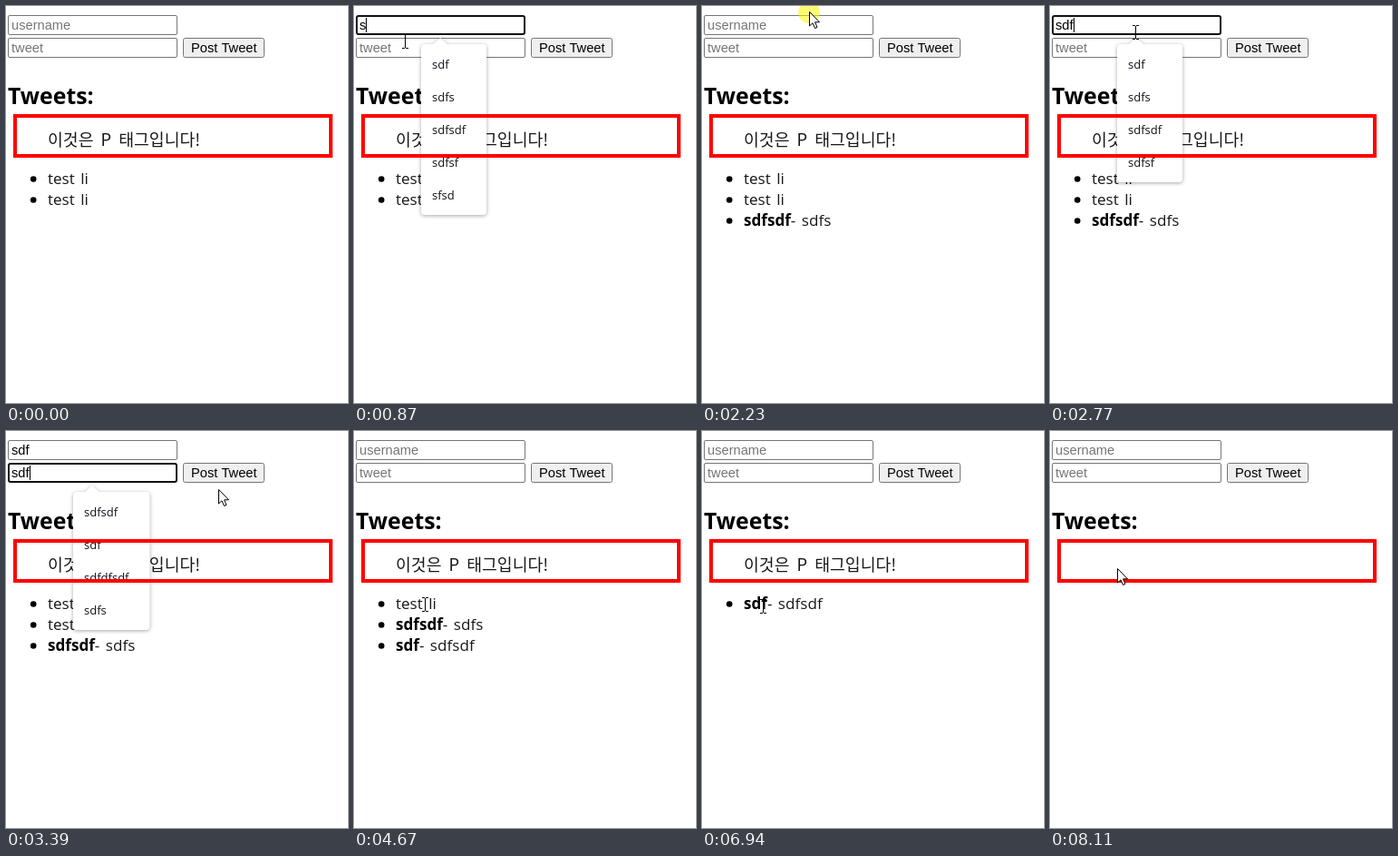
Recreate the animation shown at these times as an HTML page with a canvas. Size 377 by 437 pixels, loop 8.18 s.

```html
<!DOCTYPE html>
<html lang="ko">
<meta charset="utf-8">
<style>
html, body { margin: 0; height: 100%; overflow: hidden; background: #fff }
canvas { display: block }
</style>
<canvas id="stage" width="377" height="437"></canvas>
<script>
const c = document.getElementById('stage').getContext('2d');
const LOOP = 8180;
const UI = '14.67px "Liberation Sans", Arial, sans-serif';
const BODY = '17.1px "Open Sans", "Noto Sans", sans-serif';
const BOLD = 'bold ' + BODY;
const MENU = '13px "Open Sans", "Noto Sans", sans-serif';
const HEAD = 'bold 24.8px "Open Sans", "Noto Sans", sans-serif';
const HANGUL = '300 18.3px "Noto Sans CJK KR Light", "Noto Sans CJK KR", "Noto Sans CJK", sans-serif';
const INK = '#181818';

const fields = [
  { y: 10, hint: 'username', past: ['sdf', 'sdfs', 'sdfsdf', 'sdfsf', 'sfsd', 'asdfasdfasdfasdfasdfas'] },
  { y: 35, hint: 'tweet', past: ['sdfsdf', 'sdf', 'sdfdfsdf', 'sdfs', 'sfd', 'asd'] }
];

// What a click does to the page, given the time since the click
const type = (i, text) => (s, age) => {
  s.focus = i;
  s.open = age > 70;
  s.text[i] = text.slice(0, Math.max(0, Math.floor((age - 80) / 70)));
};
const post = s => {
  s.list.push([s.text[0], '- ' + s.text[1]]);
  s.text = ['', ''];
  s.focus = -1;
};
const drop = s => s.list.shift();
const unbold = s => { s.list[0][0] = ''; };
const clear = s => { s.para = false; };
const nothing = () => {};

// Pointer stops: arrival time, place, click
const stops = [
  [520, 265, 249],
  [680, 110, 24, type(0, 'sdfsdf')],
  [870, 56, 39],
  [1380, 62, 47, type(1, 'sdfs')],
  [1900, 240, 47, post],
  [2180, 118, 6, nothing],
  [2450, 92, 22, type(0, 'sdf')],
  [3100, 100, 46, type(1, 'sdfsdf')],
  [3320, 234, 64],
  [3670, 238, 47, post],
  [4470, 78, 191, drop],
  [5160, 77, 185, drop],
  [5760, 74, 186, unbold],
  [5910, 90, 195],
  [6180, 84, 191, drop],
  [6700, 108, 208],
  [6990, 60, 191, unbold],
  [7360, 80, 189, drop],
  [7880, 84, 152, clear],
  [8110, 74, 151]
].map(([at, x, y, click]) => ({ at, x, y, click }));

function page(t) {
  const s = { list: [['', 'test li'], ['', 'test li']], para: true, text: ['', ''], focus: -1, open: false };
  for (const { at, click } of stops) if (click && t >= at) click(s, t - at);
  return s;
}

// Rest briefly at each stop, then glide to the next in at most half a second
function pointer(t) {
  if (t >= 70 && t < 130) return { x: 198, y: 277 };
  if (t < stops[0].at) return null;
  const i = stops.findIndex(s => s.at > t);
  if (i < 0) return stops.at(-1);
  const a = stops[i - 1], b = stops[i];
  const start = Math.max(a.at + 80, b.at - 500);
  const u = Math.max(0, (t - start) / (b.at - start)), e = u * u * (3 - 2 * u);
  return { x: a.x + (b.x - a.x) * e, y: a.y + (b.y - a.y) * e };
}

const inside = (p, x, y, w, h) => p && p.x >= x && p.x < x + w && p.y >= y && p.y < y + h;

function write(s, x, y, font, color = '#000', gap = 0) {
  c.font = font;
  c.fillStyle = color;
  c.wordSpacing = gap + 'px';
  c.fillText(s, x, y);
  return x + c.measureText(s).width;
}

function disc(x, y, r, color) {
  c.fillStyle = color;
  c.beginPath();
  c.arc(x, y, r, 0, 7);
  c.fill();
}

function box(x, y, w, h, r, fill, stroke, line = 1) {
  c.beginPath();
  c.roundRect(x, y, w, h, r);
  c.fillStyle = fill;
  c.fill();
  c.strokeStyle = stroke;
  c.lineWidth = line;
  c.stroke();
}

function input({ y, hint }, value, active) {
  if (active) box(3, y + 1, 185, 20, 2, '#fff', '#101010', 2);
  else box(2.5, y + .5, 186, 21, 1.5, '#fff', '#767676');
  const end = write(value, 6, y + 16, UI);
  if (!value) write(hint, 6, y + 16, UI, '#757575');
  c.fillStyle = '#000';
  if (active) c.fillRect(Math.round(end), y + 3, 1, 16);
}

function menu(y, items) {
  if (!items.length) return;
  c.font = MENU;
  c.wordSpacing = '0px';
  const w = Math.max(...items.map(s => c.measureText(s).width)) + 35;
  c.save();
  c.shadowColor = 'rgba(0,0,0,.35)';
  c.shadowBlur = 4;
  c.shadowOffsetY = 1;
  c.fillStyle = '#fff';
  c.beginPath();
  c.roundRect(74, y, w, items.length * 36 + 8, 4);
  c.moveTo(87, y);
  c.lineTo(95, y - 7);
  c.lineTo(103, y);
  c.fill();
  c.restore();
  items.forEach((s, i) => write(s, 86, y + 27 + i * 36, MENU, '#10101c'));
}

function cursor(p, t, beam) {
  if (!p) return;
  c.save();
  c.translate(Math.round(p.x), Math.round(p.y));
  if (stops.some(s => s.click && t >= s.at - 40 && t < s.at + 100)) disc(0, 1, 12, 'rgba(250,245,0,.55)');
  c.lineWidth = 1;
  c.strokeStyle = '#000';
  if (beam) {
    c.stroke(new Path2D('M-3 -7.5h3M1 -7.5h3M.5 -7v14M-3 7.5h3M1 7.5h3'));
  } else {
    const arrow = new Path2D('M.5 .5V16L4 12.8 6.5 18.5 9 17.5 6.6 11.8H11.5Z');
    c.fillStyle = '#fff';
    c.fill(arrow);
    c.stroke(arrow);
  }
  c.restore();
}

function draw(t) {
  const p = pointer(t), s = page(t);
  c.fillStyle = '#fff';
  c.fillRect(0, 0, 377, 437);

  fields.forEach((f, i) => input(f, s.text[i], s.focus === i));
  const hover = inside(p, 195, 35, 90, 22);
  box(195.5, 35.5, 89, 21, 2, hover ? '#e5e5e5' : '#efefef', hover ? '#4f4f4f' : '#767676');
  write('Post Tweet', 204, 51, UI);

  write('Tweets:', 2, 108, HEAD);
  if (s.para) write('이것은 P 태그입니다!', 46, 154, HANGUL, INK, 4);
  s.list.forEach(([bold, text], i) => {
    const y = 196 + i * 23;
    disc(30.2, y - 5.5, 3.3, '#000');
    write(text, write(bold, 46, y, BOLD), y, BODY, INK, 2);
  });

  if (s.focus >= 0 && s.open) {
    const f = fields[s.focus];
    menu(f.y + 32, f.past.filter(o => o.startsWith(s.text[s.focus])));
  }
  c.strokeStyle = '#f00';
  c.lineWidth = 4;
  c.strokeRect(10, 121, 348, 44);

  const beam = fields.some(f => inside(p, 2, f.y, 187, 22)) ||
    s.para && inside(p, 46, 136, 168, 23) ||
    inside(p, 46, 179, 96, s.list.length * 23);
  cursor(p, t, beam);
}

function tick() {
  draw(performance.now() % LOOP);
  requestAnimationFrame(tick);
}
tick();
</script>
</html>
```
